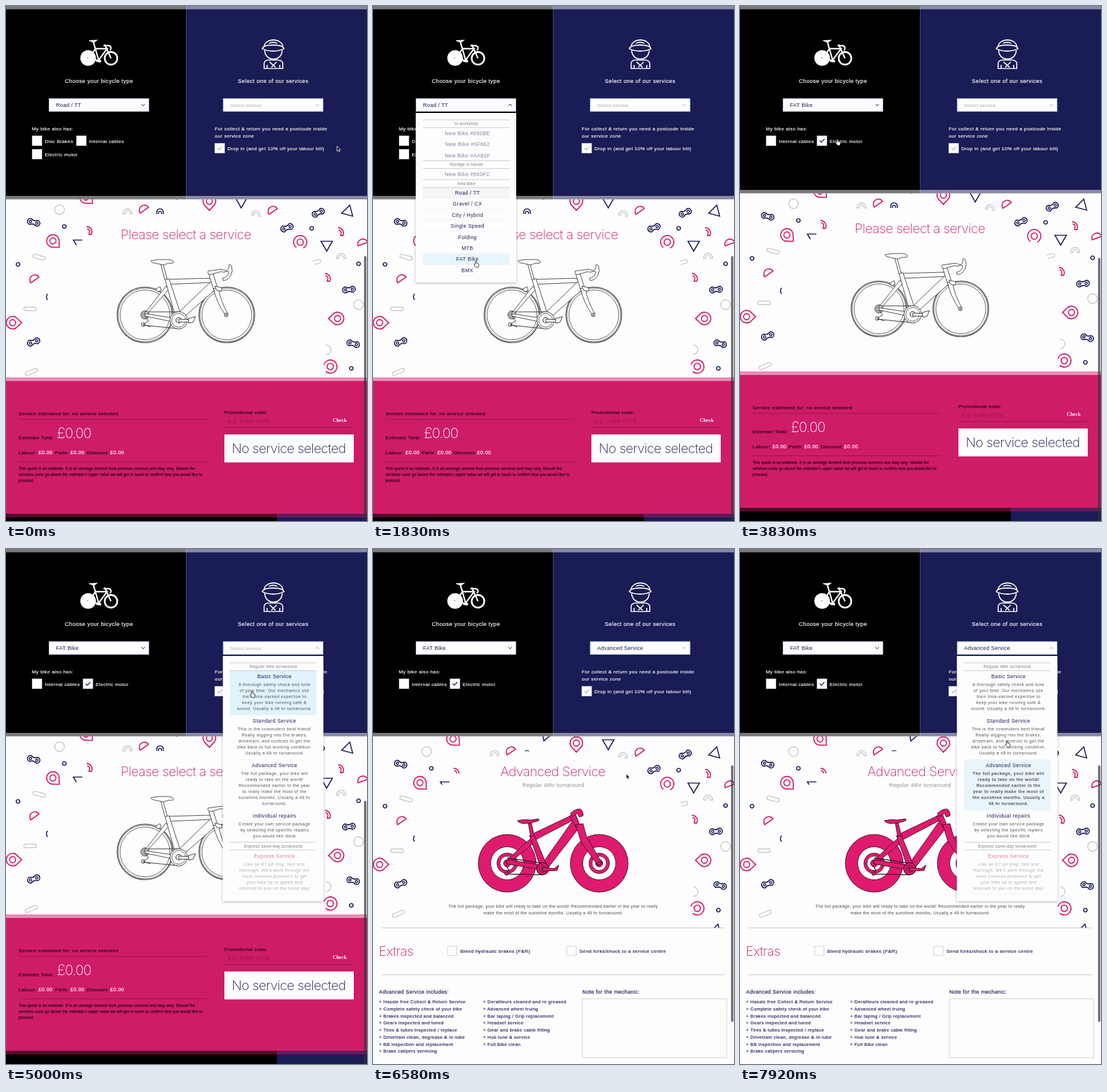
Recreate the animation shown at these times as an HTML page. Size 600 by 857 pixels, loop 8000 ms.

```html
<!DOCTYPE html>
<html lang="en">
<head>
<meta charset="utf-8">
<title>Bike service booking</title>
<style>
html, body { margin: 0; width: 100%; height: 100%; overflow: hidden; background: #fff; }
svg { display: block; width: 100%; height: 100%; }
text { font-family: "Liberation Sans", Arial, sans-serif; fill: currentColor; white-space: pre; }
.m { stroke: currentColor; stroke-width: .18px; }
.head { font-size: 9.2px; letter-spacing: .45px; }
.body { font-size: 8.1px; letter-spacing: .38px; }
.pick { font-size: 9px; letter-spacing: .25px; }
.hint { font-size: 8px; letter-spacing: .2px; }
.opt { font-size: 8.5px; letter-spacing: .45px; }
.desc { font-size: 7px; letter-spacing: .5px; }
.info { font-size: 7px; letter-spacing: .36px; }
.group { font-size: 6.5px; letter-spacing: .35px; }
.note { font-size: 6.3px; letter-spacing: .17px; }
.list { font-size: 7.5px; letter-spacing: .42px; }
.sub { font-size: 8.7px; letter-spacing: .36px; }
.thin { font-family: Inter, Roboto, sans-serif; font-weight: 250; font-size: 22px; letter-spacing: -.58px; }
.total { font-size: 23.5px; letter-spacing: -1px; }
.serif { font-family: "Liberation Serif", serif; font-weight: bold; font-size: 8.5px; }
</style>
</head>
<body>
<svg id="stage" viewBox="0 0 600 857" preserveAspectRatio="none"></svg>
<script>
const LOOP = 8000;
const NAVY = '#191c55', PINK = '#cf1c66', HOT = '#e01a6e', GREY = '#c6c6c9', INK = '#2e2e30', PAPER = '#fefdfe';

const text = (x, y, s, cls, color = '#fff', anchor = 'start') =>
  `<text x="${x}" y="${y}" class="${cls}" color="${color}" text-anchor="${anchor}">${s.replace(/&/g, '&amp;')}</text>`;
const mid = (x, y, s, cls, color) => text(x, y, s, cls, color, 'middle');
const rect = (x, y, w, h, fill, extra = '') =>
  `<rect x="${x}" y="${y}" width="${w}" height="${h}" fill="${fill}" ${extra}/>`;
const path = (d, stroke, w = 1, fill = 'none') =>
  `<path d="${d}" stroke="${stroke}" stroke-width="${w}" fill="${fill}"/>`;
const ring = (x, y, r, stroke, w = 1, fill = 'none') =>
  `<circle cx="${x}" cy="${y}" r="${r}" stroke="${stroke}" stroke-width="${w}" fill="${fill}"/>`;
const line = (x1, x2, y, color, w = 1) => path(`M${x1} ${y}H${x2}`, color, w);
const group = (id, inner, extra = '') => `<g id="${id}" ${extra}>${inner}</g>`;

// Confetti shapes, each drawn around its own centre
const shapes = {
  ring: c => ring(0, 0, 8, c, 1.5),
  dot: c => ring(0, 0, 3, c, 1.7),
  half: c => path('M-8.5 3.5A8.5 8.5 0 0 1 8.5 3.5Z', c, 1.8),
  arch: c => path('M-7.5 4V3A7.5 7.5 0 0 1 7.5 3V4H4V3A4 4 0 0 0 -4 3V4Z', c, 1.4),
  bow: c => path('M-5.5 4V1A5.5 5.5 0 0 1 5.5 1V4M-2.5 4V2A2.5 2.5 0 0 1 2.5 2V4', c, 1.7),
  arcs: c => path('M-6 -6A9 9 0 0 1 2 7H-2L-1 2A4 4 0 0 0 -5 -2', c, 1.8),
  link: c => path('M-5.5 -5A5 5 0 1 0 -5.5 5Q0 1 5.5 5A5 5 0 1 0 5.5 -5Q0 -1 -5.5 -5Z', c, 1.8) +
    ring(-5.5, 0, 1.9, c, 1.5) + ring(5.5, 0, 1.9, c, 1.5),
  pin: c => path('M-8.6 6A10.5 10.5 0 1 1 8.6 6L0 15Z', c, 1.9) + ring(0, 0, 5, c, 1.8),
  open: c => path('M-3 10.5A11 11 0 1 1 8 7.5', c, 1.8) + ring(0, 0, 5.3, c, 1.8),
  tri: c => path('M-9.5 -7.5H9.5L0 9Z', c, 1.7),
  tick: c => path('M8 -3.5H-7L-2 5', c, 1.7),
  pill: c => `<rect x="-10.5" y="-3" width="21" height="6" rx="3" fill="none" stroke="${c}" stroke-width="1.4"/>`,
  stub: c => path('M-6 -3H4A3 3 0 0 1 4 3H-5', c, 1.4),
  edge: c => path('M1 -5Q-2.5 0 1 5', c, 1.7),
  bay: c => path('M-4 -8A8 8 0 0 1 -4 8', c, 1.4)
};
const confetti = `ring G 89 339|ring G 586 497|dot N 97 367|dot N 20 430|dot N 508 370|dot N 586 429|dot N 574 603
half P 228 337 -35|half P 442 339 -35|half P 46 453 -35|half P 592 393 -20|arch G 202 342|arch G 416 345 10|arch G 557 416
bow N 256 342|arcs P 140 373|arcs P 558 375|arcs P 536 451|link N 46 360 15|link N 467 369 -20|link N 519 344 -25
link N 570 472 -5|link N 46 559 -20|link N 577 562 15|pin P 78 391 -45|pin P 133 318 -45|pin P 338 325 0
pin P 11 527 -90|pin P 551 520 90|open P 489 393 20|open P 539 600 90|tri N 391 327|tri N 533 399|tri N 569 340 195
tri N 287 313 20|tri N 571 635 195|tick N 119 393|pill G 55 418 15|pill G 40 504|pill G 42 609 -22|stub G 516 426 -15
edge N 68 484|bay G 536 572`.split(/[|\n]/).map(row => {
  const [kind, c, x, y, turn = 0] = row.split(' ');
  return `<g transform="translate(${x} ${y}) rotate(${turn})">${shapes[kind]({ G: GREY, N: NAVY, P: '#d51c69' }[c])}</g>`;
}).join('');

const bikeIcon = ring(136.5, 86.5, 13, 'none', 0, '#fff') + ring(136.5, 86.5, 1.2, 'none', 0, '#000') +
  ring(174.5, 87, 10.5, '#fff', 2.8) +
  path('M145 59L154 90L168 71H149L137 87L154 91M164 64L174.5 87M162 66H171Q177 68 173 74', '#fff', 2.4) +
  path('M138 57.5L151 57L146 60.5Z', '#fff', 1.2, '#fff') + path('M150 91L158 92', '#fff', 4);

const mechanicIcon =
  path('M429 68A15.5 11.5 0 0 1 460 68M426 71Q428 65 444 65Q460 65 462 71Q455 75 444 75Q433 75 426 71Z', '#fff', 1.8) +
  path('M430 74A14.5 14.5 0 0 0 459 74M437 62Q444 59 451 62', '#fff', 1.8) +
  path('M429 104V96Q429 91 435 90H453Q460 91 460 96V104ZM434 104V98M455 104V98M438 93L448 102M450 93L441 102', '#fff', 1.7);

function roadBike() {
  const wheel = x => [46.3, 44.8, 41.5].map((r, i) => ring(x, 514, r, INK, i ? .8 : 1.1)).join('');
  const tube = d => path(d, INK, .9, PAPER);
  return wheel(231) + wheel(367) + ring(231, 514, 7, INK, .8, '#aaa') +
    ['M266 466L230 512L233 514L270 472Z', 'M284 520L231 512V516L284 527Z',
      'M264 455L338 453L344 460L272 463Z', 'M340 459L351 469L292 521L283 514Z',
      'M264 454L271 454L291 515L282 518Z', 'M257 429L261 429L268 455L264 455Z',
      'M337 446L344 445L352 470L345 472Z', 'M345 470L353 469Q356 490 369 513L365 515Q349 492 345 470Z',
      'M241 424Q252 421 262 422Q272 421 277 424Q280 426 277 428Q269 427 262 431L248 428Q241 427 241 424Z',
      'M336 441Q334 446 340 447L357 442Q367 446 371 434L370 431Q374 429 375 434L376 441Q373 456 361 457L360 453Q370 451 370 442L358 438Z',
      'M249 471L256 467L258 473L252 476Z', 'M347 466L359 469L357 475L350 473Z'].map(tube).join('') +
    path('M231 509L286 509M228 531L286 537M231 516L237 524L228 530L240 534', INK, 1) +
    ring(228, 530, 3, INK, 1) + ring(287, 523, 14.5, INK, 1, PAPER) + ring(287, 523, 11.5, INK, .8) +
    ring(287, 523, 4.5, INK, 1.2) + path('M287 521L308 522V526L287 526Z', INK, 1, PAPER) +
    path('M303 520L315 517L311 526L304 528Z', INK, 1, PAPER) + ring(366, 514, 3, INK, 1, PAPER) + ring(366, 514, 1, INK);
}

function fatBike() {
  const dark = '#3a1426';
  const wheel = x => ring(x, 523, 48, dark, 1, HOT) + ring(x, 523, 27.5, dark, 1, PAPER) +
    ring(x, 523, 17, dark, 1, HOT) + ring(x, 523, 12, dark, .9, PAPER) + ring(x, 523, 6, dark, 1, HOT);
  const tube = d => path(d, dark, 1, HOT);
  return wheel(223) + wheel(376) +
    ['M264 480L220 520L224 525L270 487Z', 'M280 526L224 517L222 524L280 534Z',
      'M261 476L328 444L333 451L270 484Z', 'M332 452L344 462L289 533L279 527Z',
      'M260 477L268 476L289 527L279 531Z', 'M258 456L263 456L268 477L262 478Z',
      'M327 444L336 440L344 460L338 464Z', 'M337 459L349 457L355 479L381 523L374 527L346 488Z',
      'M240 452Q250 449 262 451L275 449Q278 451 273 453L262 456L251 457Q242 456 240 452Z',
      'M328 440Q338 431 345 433Q350 437 349 444L343 446L340 440L332 445Z'].map(tube).join('') +
    path('M223 514L282 523M220 541L282 542M221 526L226 535L219 541', dark, 1.5) + ring(222, 540, 3, dark, 1, HOT) +
    ring(282, 532, 10, dark, 1.4, HOT) + ring(282, 532, 6, dark, 1) + ring(282, 532, 2.5, dark, 1) +
    path('M282 530L301 532L309 526L306 535L282 536Z', dark, 1, HOT) + ring(376, 523, 3, dark, 1, HOT);
}

const chevron = (x, color) => `<path d="M${x - 2.7} 163l2.7 3.4l2.7 -3.4" stroke="${color}" stroke-width="1" fill="none"/>`;
const select = (id, x) => rect(x + .5, 154, 166, 21.5, PAPER, 'stroke="#a9b4dd" stroke-width=".8"') +
  `<text id="${id}Text" x="${x + 12}" y="168"></text><g id="${id}Arrow">${chevron(x + 157, id === 'bike' ? NAVY : '#aaa')}</g>`;
const box = (x, y, mark) => rect(x, y, 16.3, 16.3, PAPER, 'stroke="#c9cbdc" stroke-width=".6"') +
  (mark ? path(`M${x + 4.5} ${y + 8}l2.8 2.8l5 -5.2`, mark, 1.3) : '');

const hero = rect(0, 0, 299.5, 330, '#000') + rect(299.5, 0, 301, 330, NAVY) + rect(0, 0, 600, 5.5, '#fff', 'opacity=".48"') +
  bikeIcon + mechanicIcon +
  mid(154.5, 127.5, 'Choose your bicycle type', 'head m') + mid(444, 127.5, 'Select one of our services', 'head m') +
  select('bike', 71) + select('work', 360.5) +
  text(43, 207, 'My bike also has:', 'body m') +
  group('roadExtras', box(43.5, 216) + text(64.5, 227.5, 'Disc Brakes', 'body m') + box(117, 216) +
    text(138, 227.5, 'Internal cables', 'body m') + box(43.5, 238.5) + text(64.5, 249.5, 'Electric motor', 'body m')) +
  group('fatExtras', box(43.5, 216) + text(64.5, 227.5, 'Internal cables', 'body m') + box(128, 216) +
    group('motorTick', path('M132.5 224l2.8 2.8l5 -5.2', NAVY, 1.4)) + text(149, 227.5, 'Electric motor', 'body m')) +
  text(347, 207, 'For collect & return you need a postcode inside', 'body m') + text(347, 219, 'our service zone', 'body m') +
  box(347, 228.5, '#b3b3bb') + text(368, 239.5, 'Drop in (and get 10% off your labour bill)', 'body m');

const money = '£0.00';
const quote = rect(0, 618, 600, 227, PINK) + rect(0, 618, 600, 6, '#fff', 'opacity=".5"') +
  rect(0, 845, 450, 30, '#000') + rect(450, 845, 150, 30, NAVY) + rect(0, 845, 600, 6, PINK, 'opacity=".4"') +
  text(21, 681, 'Service estimated for: no service selected', 'body m', '#16060d') + line(21, 334, 688, '#94154b') +
  text(21, 720.5, 'Estimate Total:', 'body m', '#16060d') + text(84.5, 719, money, 'thin total', '#fff') +
  [['Labour:', 21, 54], ['Parts:', 81, 107], ['Discount:', 134, 173]].map(([s, x, v]) =>
    text(x, 746, s, 'body m', '#16060d') + text(v, 746, money, 'opt m')).join('') +
  line(21, 334, 758.5, '#94154b') +
  ['This quote is an estimate. It is an average derived from previous services and may vary. Should the',
    'services costs go above the estimate’s upper value we will get in touch to confirm how you would like to',
    'proceed.'].map((s, i) => text(21, 772 + i * 10, s, 'note m', '#16060d')).join('') +
  text(363, 678.5, 'Promotional code:', 'body m', '#16060d') + text(369, 694, 'e.g: TUBE-CF78', 'opt', '#94154b') +
  text(543, 692, 'Check', 'serif') + line(363, 578, 701.5, '#94154b') + rect(363, 713, 215, 46.5, PAPER) +
  mid(470, 744, 'No service selected', 'thin', NAVY);

const includes = [
  'Hassle free Collect & Return Service|Complete safety check of your bike|Brakes inspected and balanced|Gears inspected and tuned|Tires & tubes inspected / replace|Drivetrain clean, degrease & re-lube|BB inspection and replacement|Brake calipers servicing',
  'Derailleurs cleaned and re greased|Advanced wheel truing|Bar taping / Grip replacement|Headset service|Gear and brake cable fitting|Hub tune & service|Full Bike clean'
].map((col, c) => col.split('|').map((s, i) => text(c ? 183 : 10, 756.3 + i * 11.7, '+ ' + s, 'list m', NAVY)).join('')).join('');

const hollow = (x, y, w, h) => rect(x, y, w, h, PAPER, 'stroke="#cfcfd4"');
const details = rect(246, 336.5, 22, 12, PAPER) + rect(108, 392, 22, 8, PAPER) + rect(132, 373.5, 16, 10, PAPER) +
  mid(299, 377.5, 'Advanced Service', 'thin', PINK) + mid(299.5, 396, 'Regular 48hr turnaround', 'sub', '#8a8a8e') + fatBike() +
  mid(299.5, 597, 'The full package, your bike will ready to take on the world! Recommended earlier in the year to really', 'info', '#444') +
  mid(299.5, 607.5, 'make the most of the sunshine months. Usually a 48 hr turnaround.', 'info', '#444') +
  line(14, 585, 630.5, '#c4c4c8') + line(14, 585, 708.5, '#c4c4c8') + text(9.5, 677, 'Extras', 'thin', PINK) +
  hollow(124, 661, 15.5, 15.5) + text(145, 672, 'Bleed hydraulic brakes (F&R)', 'body m', NAVY) +
  hollow(322, 661, 15.5, 15.5) + text(343, 672, 'Send forks/shock to a service centre', 'body m', NAVY) +
  text(10, 739.5, 'Advanced Service includes:', 'sub m', NAVY) + text(348, 739.5, 'Note for the mechanic:', 'sub m', NAVY) +
  hollow(348, 748.5, 240, 98) + includes;

const sheet = (x, h) => rect(x, 178, 167, h, PAPER, 'filter="url(#shade)"');
const caption = (x1, x2, y, s) => line(x1, x2, y - 6.5, '#c9c9cd') + line(x1, x2, y + 6.5, '#c9c9cd') +
  mid((x1 + x2) / 2 + .3, y + 2.3, s, 'group', '#777');

const bikes = ['Road / TT', 'Gravel / CX', 'City / Hybrid', 'Single Speed', 'Folding', 'MTB', 'FAT Bike', 'BMX'];
const rowY = i => 301.6 + 18.4 * i;
const bikeMenu = sheet(71, 282) + rect(83, 302, 144, 18, '#f5f5f6') +
  bikes.map((s, i) => `<rect id="b${i}" x="83" y="${rowY(i)}" width="144" height="18.4" fill="#e6f6fe"/>` +
    mid(157, rowY(i) + 12.3, s, 'opt', NAVY) + line(83, 227, rowY(i) + 18.4, '#f0f0f3', .7)).join('') +
  [['#050BE', 212], ['#0F662', 230.4], ['#AA82F', 248.6], ['#560FC', 280]].map(([s, y]) => mid(157, y + 3, 'New Bike ' + s, 'opt', '#7d7f9c')).join('') +
  line(83, 227, 221, '#f0f0f3', .7) + line(83, 227, 239.4, '#f0f0f3', .7) +
  caption(83, 227, 196, 'In workshop') + caption(83, 227, 264, 'Storage in transit') + caption(83, 227, 295.5, 'New Bike');

const services = [
  ['Basic Service', 203, 73, 'A thorough safety check and tune|of your bike. Our mechanics use|their time-earned expertise to|keep your bike running safe &|sound. Usually a 48 hr turnaround.'],
  ['Standard Service', 277, 73, 'This is the commuters best friend!|Really digging into the brakes,|drivetrain, and controls to get the|bike back to full working condition.|Usually a 48 hr turnaround.'],
  ['Advanced Service', 350.5, 84, 'The full package, your bike will|ready to take on the world!|Recommended earlier in the year|to really make the most of the|sunshine months. Usually a 48 hr|turnaround.'],
  ['Individual repairs', 435, 52, 'Create your own service package|by selecting the specific repairs|you would like done'],
  ['Express Service', 501.5, 72, 'Like an E7 pit stop, fast and|thorough. We’ll work through the|most common problems to get|your bike up to speed and|returned to you on the same day!']
];
const boldLines = 'The full package, your bike will|ready to take on the world!|Recommended earlier in the|year to really make the most of|the sunshine months. Usually a|48 hr turnaround.';
const copy = (lines, y, color, extra = '') =>
  `<g ${extra}>${lines.split('|').map((s, i) => mid(446.3, y + i * 10, s, 'desc', color)).join('')}</g>`;
const workMenu = sheet(360.5, 408) + services.map(([name, y, h, lines], i) => {
  const off = i === 4;
  return `<rect id="s${i}" x="372" y="${y}" width="144" height="${h}"/>` + line(372, 516, y + h + .5, '#f0f0f3', .7) +
    mid(446.3, y + 12, name, 'opt', off ? '#d87aa6' : NAVY) +
    copy(lines, y + 25, off ? '#a9a9ad' : '#505055', i === 2 ? 'id="plain"' : '') +
    (i === 2 ? copy(boldLines, y + 25, '#505055', 'id="bold" font-weight="bold"') : '');
}).join('') + caption(372, 516, 196, 'Regular 48hr turnaround') + caption(372, 516, 494.5, 'Express same-day turnaround');

const arrow = path('M0 0V8.6L2 6.9L3.4 9.8L4.8 9.1L3.5 6.4H6Z', '#fff', .8, '#111');
const hand = path('M-1 -4Q0 -5.5 1 -4V-1L4 0Q5.5 1 5 3L4 6H0L-3 2Q-3 0 -1 1Z', '#222', .9, '#fff');

document.getElementById('stage').innerHTML = `<defs>
  <filter id="shade" x="-10%" y="-5%" width="120%" height="112%"><feDropShadow dx="0" dy="1.2" stdDeviation="2" flood-opacity=".28"/></filter>
  <clipPath id="band"><rect id="bandBox" x="0" width="600"/></clipPath></defs>` +
  hero + rect(0, 0, 600, 857, PAPER, 'id="paper"') +
  `<g clip-path="url(#band)">${group('confetti', confetti)}</g>` +
  group('start', mid(299, 388, 'Please select a service', 'thin', PINK) + roadBike() + quote) + group('details', details) +
  rect(0, 0, 600, 5.5, '#fff', 'id="seam" opacity=".48"') +
  rect(595, 0, 4, 440, '#333', 'id="scroll" rx="2" opacity=".68"') +
  group('bikeMenu', bikeMenu) + group('workMenu', workMenu) +
  group('cursor', group('arrow', arrow) + group('hand', hand));

const el = {};
document.querySelectorAll('[id]').forEach(n => el[n.id] = n);
const show = (id, on) => el[id].style.display = on ? '' : 'none';
const set = (id, attrs) => { for (const k in attrs) el[id].setAttribute(k, attrs[k]); };

const BIKE_OPEN = 1120, BIKE_PICK = 2120, TICK = 3380, WORK_OPEN = 4560, WORK_PICK = 6580, REOPEN = 7560;
const route = [[0, 550, 233], [350, 550, 233], [980, 160, 167], [1140, 160, 168], [1830, 171, 429], [2150, 168, 425],
  [3050, 136, 224], [3420, 136, 224], [3830, 162, 226], [4420, 440, 167], [4600, 440, 168], [5000, 409, 241], [5480, 411, 252],
  [5920, 416, 318], [6330, 420, 376], [6600, 421, 374], [7250, 431, 179], [7480, 432, 170], [7580, 433, 171], [7920, 444, 324], [8000, 444, 326]];

function cursorAt(t) {
  const i = Math.max(1, route.findIndex(k => k[0] >= t));
  const [t0, x0, y0] = route[i - 1], [t1, x1, y1] = route[i];
  const u = (t - t0) / (t1 - t0), e = u * u * (3 - 2 * u);
  return [x0 + (x1 - x0) * e, y0 + (y1 - y0) * e];
}

function menu(id, t, from, to) {
  const on = t >= from && t < to;
  show(id, on);
  if (!on) return false;
  const u = 1 - (1 - Math.min(1, (t - from) / 200)) ** 3;
  set(id, { transform: `translate(0 178) scale(1 ${.8 + .2 * u}) translate(0 -178)`, opacity: u });
  return true;
}

function label(id, s, cls, color) {
  el[id].textContent = s;
  set(id, { class: cls, color });
}

function render(t) {
  const fat = t >= BIKE_PICK, picked = t >= WORK_PICK, lift = fat ? -10 : 0;
  const top = 321.5 + lift;
  const [x, y] = cursorAt(t);

  label('bikeText', fat ? 'FAT Bike' : 'Road / TT', 'pick', NAVY);
  label('workText', picked ? 'Advanced Service' : 'Select service', picked ? 'pick' : 'hint', picked ? NAVY : '#adadb2');
  show('roadExtras', !fat);
  show('fatExtras', fat);
  show('motorTick', t >= TICK);

  set('paper', { y: top });
  set('seam', { y: top - 5.5 });
  set('bandBox', { y: top, height: picked ? 630 - top : 297 });
  set('confetti', { transform: `translate(0 ${picked ? -2 : lift})` });
  set('start', { transform: `translate(0 ${lift})` });
  show('start', !picked);
  show('details', picked);
  set('scroll', { y: picked ? 360 : fat ? 419 : 416, height: picked ? 427 : 440 });

  const bikeOn = menu('bikeMenu', t, BIKE_OPEN, BIKE_PICK);
  const opened = t >= REOPEN ? REOPEN : WORK_OPEN;
  const workOn = menu('workMenu', t, opened, t >= REOPEN ? LOOP : WORK_PICK);
  set('bikeArrow', { transform: bikeOn ? 'rotate(180 228 164.7)' : '' });
  set('workArrow', { transform: workOn ? 'rotate(180 517.5 164.7)' : '' });

  bikes.forEach((_, i) => show('b' + i, y >= rowY(i) && y < rowY(i + 1)));
  const under = services.findIndex(([, sy, h]) => y >= sy && y < sy + h + 1);
  const active = t - opened > 380 && under >= 0 ? under : picked ? 2 : 0;
  services.forEach((_, i) => {
    show('s' + i, i === active);
    set('s' + i, { fill: picked ? '#e9f5fb' : '#e1f3fd' });
  });
  show('plain', !picked);
  show('bold', picked);

  const inBike = x > 71 && x < 238, inWork = x > 360 && x < 528;
  const overSelect = y > 153 && y < 176 && (inBike || inWork);
  const overCheck = y > 215 && y < 235 && x > 43 && x < 205;
  const pointing = overSelect || overCheck || (bikeOn && inBike) || (workOn && inWork);
  set('cursor', { transform: `translate(${x} ${y})` });
  show('hand', pointing);
  show('arrow', !pointing);
}

const begin = performance.now();
function tick() {
  render((performance.now() - begin) % LOOP);
  requestAnimationFrame(tick);
}
render(0);
requestAnimationFrame(tick);
</script>
</body>
</html>
```
